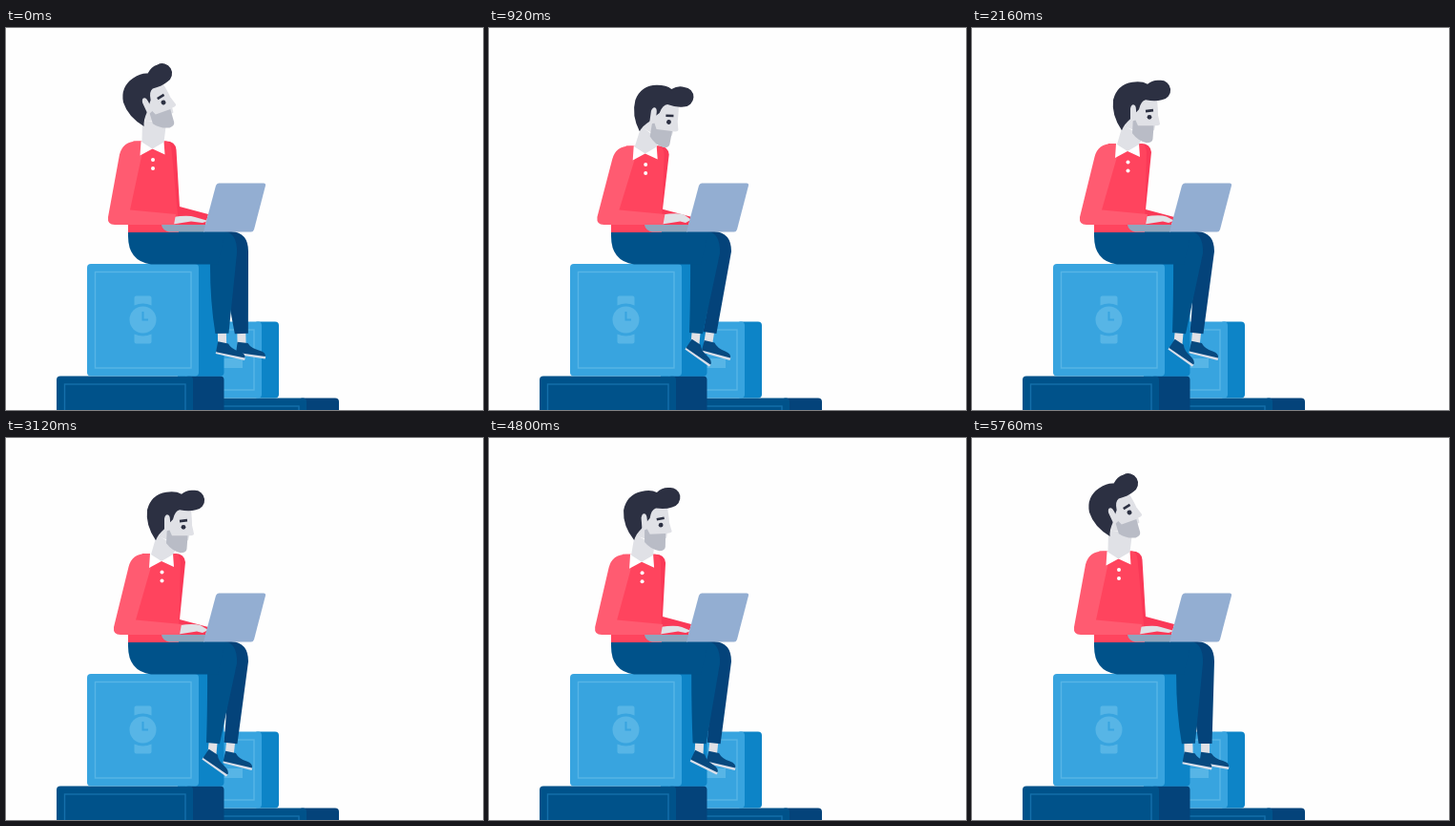
An HTML page with a canvas for the animation above (5800 ms loop, 500 px wide and 400 px high).

```html
<!DOCTYPE html>
<html lang="en">
<head>
<meta charset="utf-8">
<title>Man typing on a laptop</title>
<style>
html, body { margin: 0; width: 100%; height: 100%; overflow: hidden; background: #fefefe; }
canvas { display: block; }
</style>
</head>
<body>
<canvas width="500" height="400"></canvas>
<script>
const g = document.querySelector('canvas').getContext('2d');
const LOOP = 5800;
const SKIN = '#e0e1e6', HAIR = '#2c3042', NAVY = '#00528a', DARK = '#04437a',
  SKY = '#38a4df', SIDE = '#0d84c7', PALE = '#57b5e6';

// Poses: eye x, eye y, head tilt, collar x, collar y
const READ = [186, 93.3, 0, 163, 121],
  NOD = [188.5, 98.5, 8, 163.7, 123.5],
  UP = [165, 78, -25, 153.5, 118.5];

const lerp = (a, b, u) => a + (b - a) * u;
const mix = (p, q, u) => p.map((v, i) => lerp(v, q[i], u));
const bump = (t, centre, width) => Math.exp(-(((t - centre) / width) ** 2));
function smooth(from, to, t) {
  const u = Math.min(1, Math.max(0, (t - from) / (to - from)));
  return u * u * (3 - 2 * u);
}

function fill(color, d) {
  g.fillStyle = color;
  g.fill(new Path2D(d));
}
function line(color, width, d) {
  g.strokeStyle = color;
  g.lineWidth = width;
  g.stroke(new Path2D(d));
}
function dot(color, x, y, r) {
  g.fillStyle = color;
  g.beginPath();
  g.arc(x, y, r, 0, 7);
  g.fill();
}
function round(color, x, y, right, bottom) {
  g.fillStyle = color;
  g.beginPath();
  g.roundRect(x, y, right - x, bottom - y, 4);
  g.fill();
}
function at(x, y, deg, draw) {
  g.save();
  g.translate(x, y);
  g.rotate(deg * Math.PI / 180);
  draw();
  g.restore();
}

// A box with its front, its side and a thin frame on the front
function box(x, y, split, right, bottom, front, side, frame) {
  round(side, split - 8, y, right, bottom);
  round(front, x, y, split, bottom);
  g.strokeStyle = frame;
  g.lineWidth = 1.4;
  g.strokeRect(x + 8.5, y + 8.5, split - x - 16.5, bottom - y - 17);
}

function boxes() {
  box(200, 387.5, 315, 349, 500, NAVY, DARK, '#1470ab');
  box(180, 307.5, 268, 286, 387.5, SKY, SIDE, PALE);
  fill(PALE, 'M228 346H248V356H228z');
  box(53, 364.5, 196, 228.5, 500, NAVY, DARK, '#1470ab');
  box(85, 247, 202, 228.5, 364.5, SKY, SIDE, PALE);
  for (const flip of [0, 180]) {
    at(143.5, 305.5, flip, () =>
      fill(PALE, 'M-7 -25H7Q9 -25 9 -23V-15Q0 -19 -9 -15V-23Q-9 -25 -7 -25z'));
  }
  dot(PALE, 143.5, 305.5, 14);
  line(SKY, 2, 'M143.500 297V305.500H149');
}

function shin(kneeX, ankleX, tilt, color, front, back) {
  const sin = (ankleX - kneeX) / 88, cos = Math.sqrt(1 - sin * sin);
  const y = 232 + 88 * cos;
  const footX = ankleX + 9.5 * sin, footY = y + 9.5 * cos;
  line(SKIN, 9, `M${ankleX - sin} ${y - cos}L${footX + sin * 2} ${footY + cos * 2}`);
  at(footX + 1.5, footY, tilt, () => {
    fill('#d9dfea', 'M-6 10H24Q26 11 25 14L-6 13z');
    fill('#07497f', 'M-6 0H5Q9 5 18 6Q25 7 25 11.500L-6 11z');
  });
  fill(color, `M${front}L${ankleX + 7 * cos} ${y - 7 * sin}L${ankleX - 7 * cos} ${y + 7 * sin}` +
    `Q${back[0]} ${back[1] + 40} ${back}z`);
}

function legs(t, nod, up) {
  // The far leg kicks out as he looks up, then swings to rest
  const s = (t < 2900 ? t + LOOP : t) - 5220;
  const swing = 28 * Math.cos(s * 2 * Math.PI / 980) * Math.exp(-Math.abs(s) / 890);
  const far = lerp(235.5 - 4 * nod, 259 + swing, up);
  const near = lerp(217, 224 - .2 * swing, up) + 12 * bump(t, 3900, 260);
  shin(245, far, 12 - .45 * (far - 236), DARK, '215 213H236Q254 214 254 234', [232, 245]);
  shin(225, near, 36 - 2.4 * (near - 216), NAVY, '205 213H228Q243 214 242 236',
    [213.5 + (near - 225) * .3, 247]);
  fill(NAVY, 'M128 213H230L222 247.500H152Q128 244 128 218z');
}

function torso(x, y, typing, tap) {
  const elbow = 113 + (x - 163) * .63, wrist = elbow + 70;
  fill('#fa3957', `M${x + 12} ${y}Q${x + 24} ${y - 1} ${x + 25} ${y + 9}L182 ${187 + 3 * typing}` +
    `L212 ${195 + 3 * typing}L209 206H176z`);
  fill('#ff445e', `M${x - 20} ${y}H${x + 14}Q${x + 19} ${y} ${x + 20} ${y + 9}L181 206V214H128V190z`);
  fill('#8fa5bd', 'M163 206H211L208 213.500H171Q164 212 163 206z');
  fill(SKIN, `M${wrist - 2} ${198 - tap}Q${wrist + 14} ${195.5 - tap} ${wrist + 21} ${198 - tap}` +
    `L212 ${202 - tap / 2}L206 204L${wrist + 17} 202.500L${wrist - 2} 205.500z`);
  fill('#ff5b71', `M${x - 12} ${y}H${x - 16}Q${x - 31} ${y} ${x - 34.5} ${y + 14}L${elbow} 198` +
    `Q${elbow - 1} 206 ${elbow + 7} 206H${wrist - 1}L${wrist + 1} 195L${elbow + 23} 190.500L${x - 11} ${y + 14}z`);
  fill('#fff', `M${x - 12} ${y}L${x - 13} ${y + 15}L${x} ${y + 8}L${x + 13} ${y + 14}L${x + 12} ${y}z`);
  dot('#fff', x + .5, y + 19.5, 2);
  dot('#fff', x + .5, y + 28.5, 2);
}

function head(x, y, tilt, collarX, collarY, blink) {
  const r = tilt * Math.PI / 180, c = Math.cos(r), s = Math.sin(r);
  const out = (u, v) => `${x + u * c - v * s} ${y + u * s + v * c}`;
  fill(SKIN, `M${out(-28, 8)}L${out(-8, 20)}L${out(-9, 25)}L${collarX + 12} ${collarY + 1}` +
    `L${collarX} ${collarY + 8}L${collarX - 11} ${collarY + 1}z`);
  at(x, y, tilt, () =>
    fill(SKIN, 'M-14 -19L8 -18Q9 -8 9 -2L11 7Q11 9 6 9L5 14L-10 16L-26 10L-20 -8z'));
  at(x, y, tilt * .8, () =>
    fill('#b9bcc6', 'M-17 -2L-12 9H4.500L3.500 23Q3 27 -3 27Q-12 25 -18 17z'));
  at(x, y, tilt, () => {
    fill(HAIR, 'M-29 14Q-40 -2 -38 -18Q-34 -34 -18 -36.500Q-8 -38 -2 -34.500Q4 -39.500 11 -38.500' +
      'A10.300 10.300 0 0 1 13 -18Q6 -16 -4 -18Q-9 -17 -11 -8L-14 -5L-20 2Q-27 8 -29 14z');
    fill(SKIN, 'M-20 -9Q-19 -13 -17 -13Q-14 -13 -14 -7V3L-20 5z');
    line(HAIR, 2.6, 'M-4 -6.200L4 -7.200');
    if (blink) line(HAIR, 1.8, 'M-2.500 0Q0 1.500 2.500 0');
    else dot(HAIR, 0, 0, 2.4);
  });
}

function frame(now) {
  const t = now % LOOP;
  const up = 1 - smooth(600, 920, t) + smooth(4600, 5100, t);
  const nod = 1 - smooth(1000, 1900, t) + smooth(3200, 3750, t);
  const typing = smooth(750, 950, t) - smooth(3500, 3700, t);
  const tap = typing * (1.5 + 1.2 * Math.sin(t / 45));
  const hop = 4 * (bump(t, 340, 120) + bump(t, 5090, 120));
  const blink = [3800, 5590].some(at => Math.abs(t - at) < 70);
  const [eyeX, eyeY, tilt, x, y] = mix(mix(READ, NOD, nod), UP, up);

  g.fillStyle = '#fefefe';
  g.fillRect(0, 0, 500, 400);
  boxes();
  legs(t, nod, up);
  torso(x, y - hop / 4, typing, tap);
  head(eyeX, eyeY - hop, tilt, x, y - hop / 4, blink);
  fill('#93aed2', 'M223 162.500H270Q272.500 162.500 272 165L260 211Q259 213.500 257 213.500' +
    'H207L220 165Q221 162.500 223 162.500z');
}

const start = performance.now();
function tick() {
  frame(performance.now() - start);
  requestAnimationFrame(tick);
}
tick();
</script>
</body>
</html>
```
